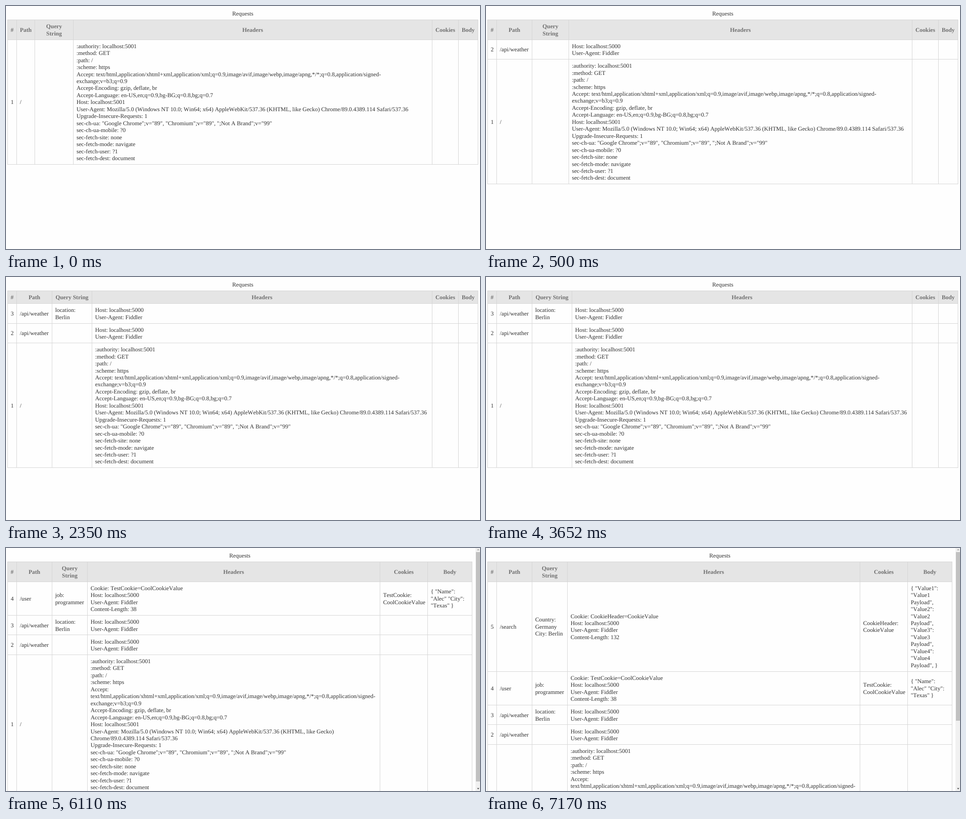
An HTML page for the animation above (8 s loop, 1045 by 536 pixels).

```html
<!DOCTYPE html>
<html lang="en">
<head>
<meta charset="utf-8">
<title>Requests</title>
<style>
  html, body { margin: 0; width: 100%; height: 100%; overflow: hidden; background: #fefefe; }
  svg { display: block; width: 1045px; height: 536px; }
  text {
    font: 12.88px "Liberation Serif", "Times New Roman", Times, serif;
    font-kerning: none; font-variant-ligatures: none;
    fill: #303030; white-space: pre; text-rendering: geometricPrecision;
  }
  .head { font-weight: bold; fill: #707070; }
  .mid { text-anchor: middle; }
  .rule { fill: none; stroke: #d5d5d5; shape-rendering: crispEdges; }
</style>
</head>
<body>
<svg id="stage" viewBox="0 0 1045 536"></svg>
<script>
const stage = document.getElementById('stage');
const LOOP = 8000, LINE = 15.45, PAD = 12.55, TOP = 30.6, INSET = 6.9, BASE = 4.7;

const ACCEPT = 'text/html,application/xhtml+xml,application/xml;q=0.9,image/avif,image/webp,image/apng,*/*;q=0.8,application/signed-';
const AGENT = 'User-Agent: Mozilla/5.0 (Windows NT 10.0; Win64; x64) AppleWebKit/537.36 (KHTML, like Gecko)';
const CHROME = 'Chrome/89.0.4389.114 Safari/537.36';

const pageHeaders = narrow => [
  ':authority: localhost:5001', ':method: GET', ':path: /', ':scheme: https',
  ...(narrow ? ['Accept:', ACCEPT] : ['Accept: ' + ACCEPT]),
  'exchange;v=b3;q=0.9',
  'Accept-Encoding: gzip, deflate, br',
  'Accept-Language: en-US,en;q=0.9,bg-BG;q=0.8,bg;q=0.7',
  'Host: localhost:5001',
  ...(narrow ? [AGENT, CHROME] : [AGENT + ' ' + CHROME]),
  'Upgrade-Insecure-Requests: 1',
  'sec-ch-ua: "Google Chrome";v="89", "Chromium";v="89", ";Not A Brand";v="99"',
  'sec-ch-ua-mobile: ?0', 'sec-fetch-site: none', 'sec-fetch-mode: navigate',
  'sec-fetch-user: ?1', 'sec-fetch-dest: document'
];

const client = ['Host: localhost:5000', 'User-Agent: Fiddler'];
const payload = [1, 2, 3, 4].flatMap(n =>
  [`${n === 1 ? '{ ' : ''}"Value${n}":`, `"Value${n}`, `Payload",${n === 4 ? ' }' : ''}`]);

// Cells: path, query string, headers, cookies, body
const requests = narrow => [
  [['/'], [], pageHeaders(narrow), [], []],
  [['/api/weather'], [], client, [], []],
  [['/api/weather'], ['location:', 'Berlin'], client, [], []],
  [['/user'], ['job:', 'programmer'],
    ['Cookie: TestCookie=CoolCookieValue', ...client, 'Content-Length: 38'],
    ['TestCookie:', 'CoolCookieValue'],
    ['{ "Name":', '"Alec" "City":', '"Texas" }']],
  [['/search'], ['Country:', 'Germany', 'City: Berlin'],
    ['Cookie: CookieHeader=CookieValue', ...client, 'Content-Length: 132'],
    ['CookieHeader:', 'CookieValue'], payload]
];

const wide = (path, query) => [3.5, 23.5, path, query, 939.5, 997.5, 1040.5];
const narrowCols = [3.5, 23.5, 101.5, 179.5, 824.5, 929.5, 1027.5];
const scenes = [
  { at: 0, count: 1, cols: wide(63.5, 148.5) },
  { at: 500, count: 2, cols: wide(101.5, 182.5) },
  { at: 2350, count: 3, cols: wide(101.5, 189.5), oneLineHead: true },
  { at: 4520, count: 4, cols: narrowCols, thumbEnd: 515 },
  { at: 7170, count: 5, cols: narrowCols, thumbEnd: 381 }
];

const esc = s => s.replace(/&/g, '&amp;').replace(/</g, '&lt;');
const rect = (x, y, w, h, fill) =>
  `<rect x="${x}" y="${y}" width="${w}" height="${h}" fill="${fill}"/>`;

// Lines of text centred vertically on y
const block = (lines, x, y, cls = '') => lines.map((s, i) =>
  `<text class="${cls}" x="${x}" y="${y + (i - (lines.length - 1) / 2) * LINE + BASE}">${esc(s)}</text>`
).join('');

function scrollbar(end) {
  return rect(1035, 0, 10, 536, '#f1f1f1') + rect(1036, 9, 9, end - 9, '#c1c1c1') +
    '<path d="M1038.5 5h5l-2.5-3z" fill="#a3a3a3"/><path d="M1038.5 529.5h5l-2.5 3z" fill="#505050"/>';
}

function draw({ count, cols, oneLineHead, thumbEnd }) {
  const left = cols[0], right = cols[6];
  const query = oneLineHead ? ['Query String'] : ['Query', 'String'];
  const head = [['#'], ['Path'], query, ['Headers'], ['Cookies'], ['Body']];
  const rows = requests(!!thumbEnd).slice(0, count)
    .map((cells, i) => [[String(i + 1)], ...cells]).reverse();
  let y = TOP, text = '', rules = '', fill = '';

  [head, ...rows].forEach((cells, r) => {
    const h = Math.max(...cells.map(c => c.length)) * LINE + PAD;
    rules += `M${left - .5} ${Math.floor(y) + .5}H${right + .5}`;
    if (!r) fill = rect(left, 31, right - left, Math.floor(y + h) - 31, '#e5e5e5');
    cells.forEach((lines, c) => {
      text += r ? block(lines, cols[c] + INSET, y + h / 2)
        : block(lines, (cols[c] + cols[c + 1]) / 2, y + h / 2, 'head mid');
    });
    y += h;
  });

  const bottom = Math.floor(y) + .5;
  rules += `M${left} ${bottom}H${right}` + cols.map(x => `M${x} 31V${bottom + .5}`).join('');
  stage.innerHTML = block(['Requests'], (left + right) / 2, 16.6, 'mid') + fill +
    `<path class="rule" d="${rules}"/>` + text + (thumbEnd ? scrollbar(thumbEnd) : '');
}

let shown;
const start = performance.now();
function update() {
  const t = (performance.now() - start) % LOOP;
  const scene = scenes.filter(s => s.at <= t).pop();
  if (scene !== shown) draw(shown = scene);
  requestAnimationFrame(update);
}
update();
</script>
</body>
</html>
```
